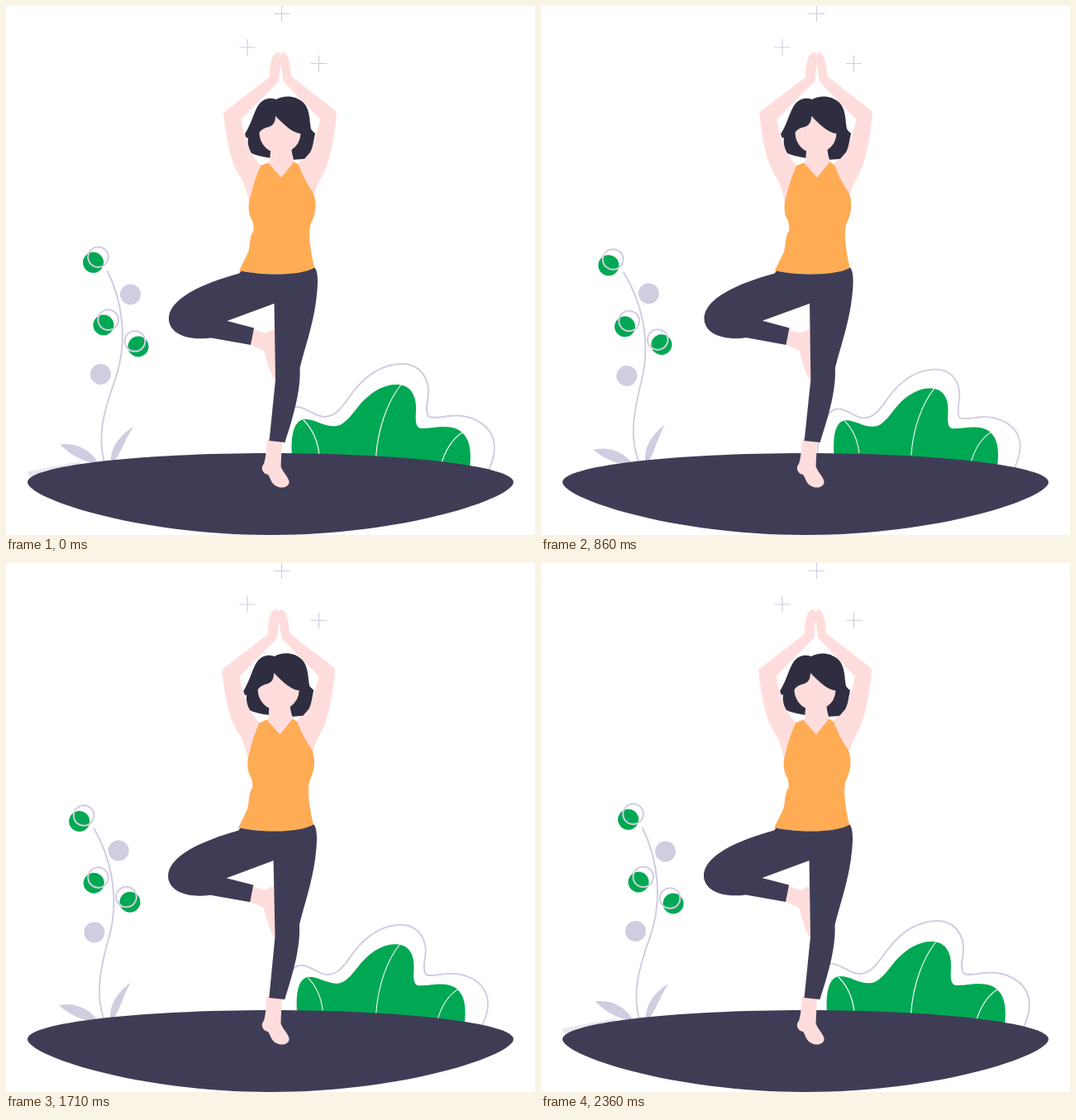
An HTML page with a canvas for the animation above (2430 ms loop, 640 by 640 pixels).

```html
<!DOCTYPE html>
<html lang="en">
<head>
<meta charset="utf-8">
<title>Tree pose</title>
<style>
html, body { margin: 0; width: 100%; height: 100%; overflow: hidden; background: #fff; }
canvas { display: block; width: 100vw; height: 100vh; }
</style>
</head>
<body>
<canvas id="stage"></canvas>
<script>
const canvas = document.getElementById('stage');
const ctx = canvas.getContext('2d');
const SIZE = 640, LOOP = 2430, SWING = 2360;
const LILAC = '#d0cde1', GREEN = '#00a853', NAVY = '#3f3d56',
      HAIR = '#2f2e41', SKIN = '#ffdddc', ORANGE = '#ffac55';

const shape = {
  ground: 'M26 576C26 556.700 157.600 541 320 541S614 556.700 614 576C614 595.500 482 640 320 640S26 595.500 26 576Z',
  haze: 'M26 563L90 551V570L28 570Z',
  stem: 'M122.5 320C141 357 148 406 132 452C117 494 111 520 118.5 551',
  leaves: 'M65.5 530.5C85 528 103 537 112 554C95 552 80 545 65.5 530.5Z' +
          'M154 509C137 520 125 535 127 555C138 545 142 528 154 509Z',
  bush: 'M346 545C344 515 350 500 362 500C375 500 386 510 400 508C412 506 421 490 431 479' +
        'C444 465 460 457 474 458C491 459 497 473 496 490C495 503 496 511 503 511' +
        'C518 511 532 506 546 512C560 519 564 535 561 560L346 560Z',
  veins: 'M478 458C462 478 450 510 447.5 546M360 501C370 511 377 525 379 543M552 516C540 524 531 538 526 556',
  contour: 'M582 566C592 545 594 530 586 516C576 500 555 494 537 496C526 497 514 500 511 496' +
           'C506 488 512 475 511 463C509 445 497 433 480 433C455 433 435 447 419 468' +
           'C408 483 400 497 385 497C373 497 366 486 352 485C338 484 326 510 324 543',
  leftArm: 'M319 86C319 70 322 56 329 56C333 57 333 63 332 73L330 91L284.500 137' +
           'C288 160 296 182 309 193L316 215L294 237C291 222 287 211 283 206C271 188 266 158 263 129Z',
  rightArm: 'M345 85C344 68 341 56 335 56C331 57 331 65 333 74L335.500 91L380 137' +
            'C376 160 367 180 353 191L350 215L373 228C376 217 380 210 384 203C393 184 398 154 400 130Q400 128 398 126Z',
  hair: 'M289 155C298 140 300 127 306 119C312 111 320 110.500 327 113C336 107.500 351 108 360 117' +
        'C368 125 367 139 369 149Q371 152 374 154C372 164 371 172 368 177L361 185L347 186L320 184' +
        'Q302 181 297 178C293 171 292 165 293 159L291 160Z',
  face: 'M326 133C326 144 320 146 315 147Q309 149 306.500 153A25 25 0 0 0 320 175.500L319 188L314 195L333 209L351 192' +
        'Q347 186 345.500 174A25 25 0 0 0 356.500 154.500C345 153 335 142 326 133Z',
  top: 'M308 193.500L317 189.500L333 207.500L348.500 188.500L354 192C359 205 364 215 371 225' +
       'C376 235 376 249 369 263C365 273 368 295 373.500 318C356 328 309 325 282 320.500L293 298' +
       'C296 289 294 279 299.500 272Q300 267 298.500 261C292 250 293 238 296 230C299 216 303 205 308 193.500Z',
  raisedFoot: 'M299 390Q309 396 316 395Q322 391 327 391V456C318 442 315 426 312 417L295 409Z',
  foot: 'M316 524H334L332.500 557C335 564 341 569 342.500 575C343 581 337 583 332 582.500' +
        'C320 580 321 572 317 567C312 566 309 562 310 557C315 551 314 538 316 524Z',
  pants: 'M284.500 320.500C311 326 356 327 373.500 316.500C379 323 377 344 375 358C371 387 362 412 355.500 438' +
         'C357 467 346 501 337.500 528L318.500 526L326 452L324.500 360L267.500 381L300 389.500L296 410L248 401.500' +
         'C222 405 199 398 197 380C195 354 240 335 282 323.500Z'
};
const path = {};
for (const name in shape) path[name] = new Path2D(shape[name]);

function fill(name, color) {
  ctx.fillStyle = color;
  ctx.fill(path[name]);
}

function line(name, color, width) {
  ctx.strokeStyle = color;
  ctx.lineWidth = width;
  ctx.stroke(path[name]);
}

function disc(x, y, color) {
  ctx.fillStyle = color;
  ctx.beginPath();
  ctx.arc(x, y, 12.5, 0, Math.PI * 2);
  ctx.fill();
}

function ring(x, y) {
  ctx.strokeStyle = LILAC;
  ctx.lineWidth = 2;
  ctx.beginPath();
  ctx.arc(x, y, 12.3, 0, Math.PI * 2);
  ctx.stroke();
}

function cross(x, y) {
  ctx.strokeStyle = LILAC;
  ctx.lineWidth = 1.2;
  ctx.beginPath();
  ctx.moveTo(x - 9.7, y);
  ctx.lineTo(x + 9.7, y);
  ctx.moveTo(x, y - 9.7);
  ctx.lineTo(x, y + 9.7);
  ctx.stroke();
}

// Draw around a pivot, turned and scaled.
function pose(x, y, angle, scale, draw) {
  ctx.save();
  ctx.translate(x, y);
  ctx.rotate(angle);
  ctx.scale(scale, scale);
  ctx.translate(-x, -y);
  draw();
  ctx.restore();
}

const ease = u => (1 - Math.cos(Math.PI * u)) / 2;

// There and back, a little brisker than a plain cosine.
function bendAt(p) {
  const u = 1 - Math.abs(1 - 2 * p);
  return 0.75 * ease(u) + 0.25 * u;
}

// Rest, right, rest, left, rest: each quarter eases on its own.
function sway(p) {
  const q = p * 4, half = q % 2;
  const amount = half < 1 ? ease(half) : ease(2 - half);
  return q < 2 ? amount : -amount;
}

function plant() {
  fill('haze', '#e6eaee');
  fill('leaves', LILAC);
  line('stem', LILAC, 2);
  disc(150.5, 349, LILAC);
  disc(114.5, 445.5, LILAC);
  disc(105.6, 310.3, GREEN);
  disc(118, 386, GREEN);
  disc(160, 412, GREEN);
  ring(111.5, 303.7);
  ring(123.7, 379.7);
  ring(156, 405.5);
}

function bush() {
  line('contour', LILAC, 2);
  fill('bush', GREEN);
  line('veins', '#fff', 1.1);
}

function woman() {
  fill('leftArm', SKIN);
  fill('rightArm', SKIN);
  fill('hair', HAIR);
  fill('face', SKIN);
  fill('top', ORANGE);
  fill('raisedFoot', SKIN);
  fill('foot', SKIN);
  fill('pants', NAVY);
}

function render(now) {
  const w = Math.round(innerWidth * devicePixelRatio);
  const h = Math.round(innerHeight * devicePixelRatio);
  if (canvas.width !== w || canvas.height !== h) {
    canvas.width = w;
    canvas.height = h;
  }
  ctx.setTransform(w / SIZE, 0, 0, h / SIZE, 0, 0);
  ctx.fillStyle = '#fff';
  ctx.fillRect(0, 0, SIZE, SIZE);

  const p = Math.min(now % LOOP / SWING, 1);
  const bend = bendAt(p);
  cross(333.5, 9.5);
  cross(292, 50);
  cross(378.5, 69.5);
  pose(129, 556, -0.121 * bend, 1, plant);
  pose(452, 515, 0, 1 - 0.1 * bend, bush);
  fill('ground', NAVY);
  pose(326, 572, 0.0044 * sway(p), 1, woman);
}

const start = performance.now();
function tick() {
  render(performance.now() - start);
  requestAnimationFrame(tick);
}
tick();
</script>
</body>
</html>
```
